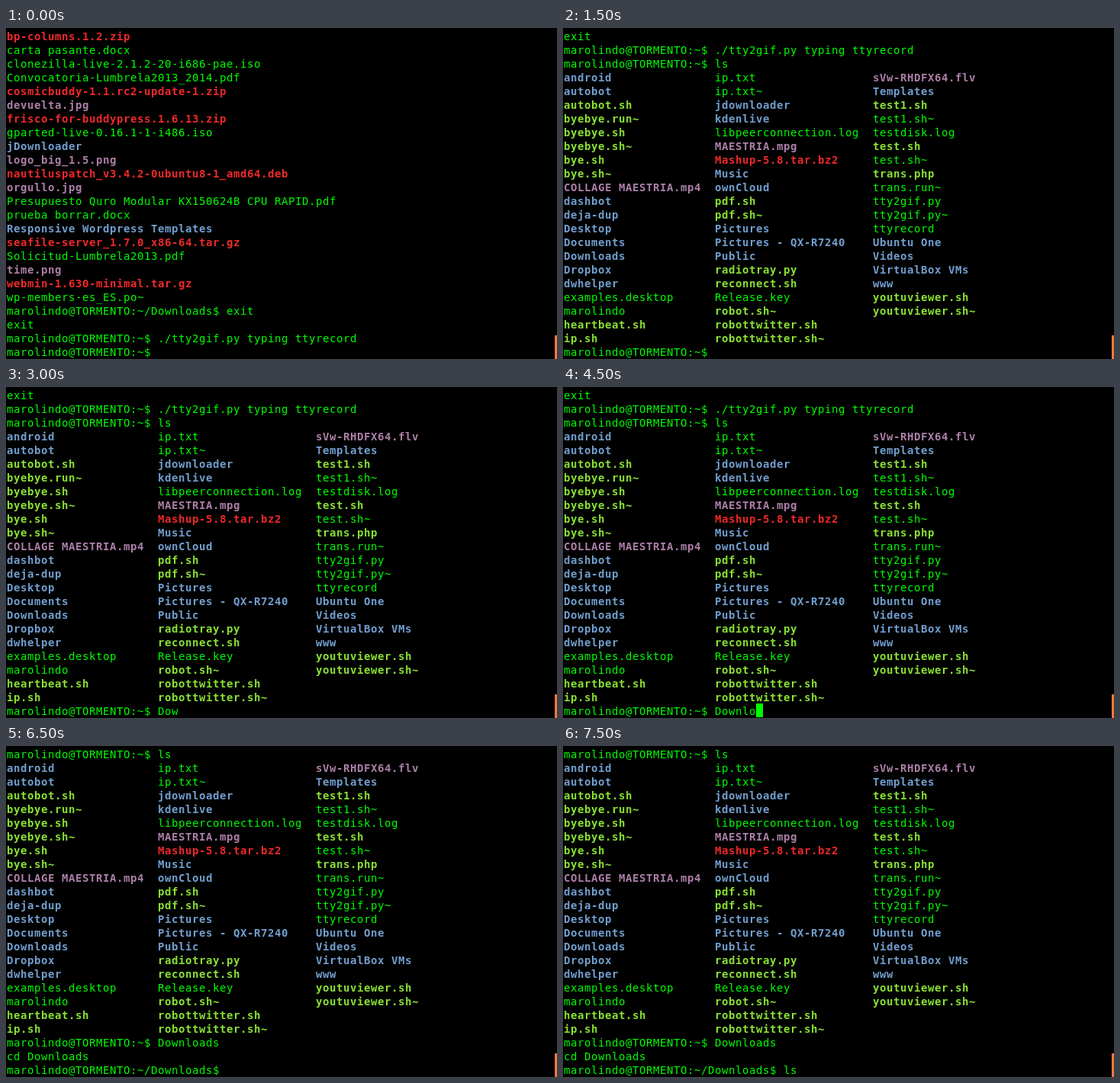
Write an HTML page that moves like this. It is 722 px wide and 434 px high and loops after 8000 ms.

```html
<!DOCTYPE html>
<html lang="es">
<head>
<meta charset="utf-8">
<title>Terminal</title>
<style>
html, body { margin: 0; width: 100%; height: 100%; overflow: hidden; background: #000; }
/* letter-spacing rounds the advance up to the 9px terminal cell */
#term {
  position: absolute; left: 1px; top: 2px; margin: 0; width: 721px; height: 432px;
  font: 14px/18px "DejaVu Sans Mono", monospace; letter-spacing: 0.572px;
  color: #0f0; white-space: pre; font-variant-ligatures: none;
}
#term b { font-weight: 700; }
.R { color: #ef2929; }
.B { color: #729fcf; }
.M { color: #ad7fa8; }
.X { color: #8ae234; }
#cursor { position: absolute; width: 9px; height: 18px; top: 415px; background: #0f0; }
#thumb { position: absolute; left: 719px; top: 403px; width: 3px; height: 31px; background: #f07746; }
</style>
</head>
<body>
<pre id="term"></pre>
<div id="cursor"></div>
<div id="thumb"></div>
<script>
const LOOP = 8000, STEP = 500, ROWS = 24, CELL = 9;
const USER = 'marolindo', HOST = USER + '@TORMENTO:';
const home = HOST + '~$ ', downloads = HOST + '~/Downloads$ ';

// First letter of each entry is its colour: G plain, the rest bold.
const files = `Rbp-columns.1.2.zip
Gcarta pasante.docx
Gclonezilla-live-2.1.2-20-i686-pae.iso
GConvocatoria-Lumbrela2013_2014.pdf
Rcosmicbuddy-1.1.rc2-update-1.zip
Mdevuelta.jpg
Rfrisco-for-buddypress.1.6.13.zip
Ggparted-live-0.16.1-1-i486.iso
BjDownloader
Mlogo_big_1.5.png
Rnautiluspatch_v3.4.2-0ubuntu8-1_amd64.deb
Morgullo.jpg
GPresupuesto Quro Modular KX150624B CPU RAPID.pdf
Gprueba borrar.docx
BResponsive Wordpress Templates
Rseafile-server_1.7.0_x86-64.tar.gz
GSolicitud-Lumbrela2013.pdf
Mtime.png
Rwebmin-1.630-minimal.tar.gz
Gwp-members-es_ES.po~`.split('\n');

const columns = [
  `Bandroid|Bautobot|Xautobot.sh|Xbyebye.run~|Xbyebye.sh|Xbyebye.sh~|Xbye.sh|Xbye.sh~|MCOLLAGE MAESTRIA.mp4|Bdashbot|Bdeja-dup|BDesktop|BDocuments|BDownloads|BDropbox|Bdwhelper|Gexamples.desktop|G${USER}|Xheartbeat.sh|Xip.sh`,
  'Gip.txt|Gip.txt~|Bjdownloader|Bkdenlive|Glibpeerconnection.log|MMAESTRIA.mpg|RMashup-5.8.tar.bz2|BMusic|BownCloud|Xpdf.sh|Xpdf.sh~|BPictures|BPictures - QX-R7240|BPublic|Xradiotray.py|Xreconnect.sh|GRelease.key|Xrobot.sh~|Xrobottwitter.sh|Xrobottwitter.sh~',
  'MsVw-RHDFX64.flv|BTemplates|Xtest1.sh|Gtest1.sh~|Gtestdisk.log|Xtest.sh|Gtest.sh~|Xtrans.php|Gtrans.run~|Gtty2gif.py|Gtty2gif.py~|Gttyrecord|BUbuntu One|BVideos|BVirtualBox VMs|Bwww|Xyoutuviewer.sh|Xyoutuviewer.sh~'
].map(c => c.split('|'));
const widths = [22, 23, 0];

function paint(entry, width = 0) {
  const kind = entry[0], name = entry.slice(1);
  const pad = ' '.repeat(Math.max(0, width - name.length));
  return (kind === 'G' ? name : `<b class="${kind}">${name}</b>`) + pad;
}

const history = [
  ...files.map(f => paint(f)),
  downloads + 'exit', 'exit',
  home + './tty2gif.py typing ttyrecord'
];
const listing = columns[0].map((_, row) =>
  columns.map((col, i) => col[row] ? paint(col[row], widths[i]) : '').join(''));

const afterLs = [...history, home + 'ls', ...listing];
const afterCd = [...afterLs, home + 'Downloads', 'cd Downloads'];

// Each scene types its text one key per step.
const scenes = [
  { from: 0, lines: history, prompt: home, typed: 'ls' },
  { from: 3, lines: afterLs, prompt: home, typed: 'Downloads' },
  { from: 13, lines: afterCd, prompt: downloads, typed: 'ls' }
];
const CURSOR_STEP = 9;

const term = document.getElementById('term');
const cursor = document.getElementById('cursor');
let shown = -1;

function draw(step) {
  const scene = scenes.filter(s => s.from <= step).pop();
  const input = scene.prompt + scene.typed.slice(0, step - scene.from);
  term.innerHTML = [...scene.lines, input].slice(-ROWS).join('\n');
  cursor.style.left = 1 + CELL * input.length + 'px';
  cursor.hidden = step !== CURSOR_STEP;
}

const start = performance.now();
function tick(now) {
  const step = Math.floor(Math.max(0, now - start) % LOOP / STEP);
  if (step !== shown) draw(shown = step);
  requestAnimationFrame(tick);
}
draw(shown = 0);
requestAnimationFrame(tick);
</script>
</body>
</html>
```
